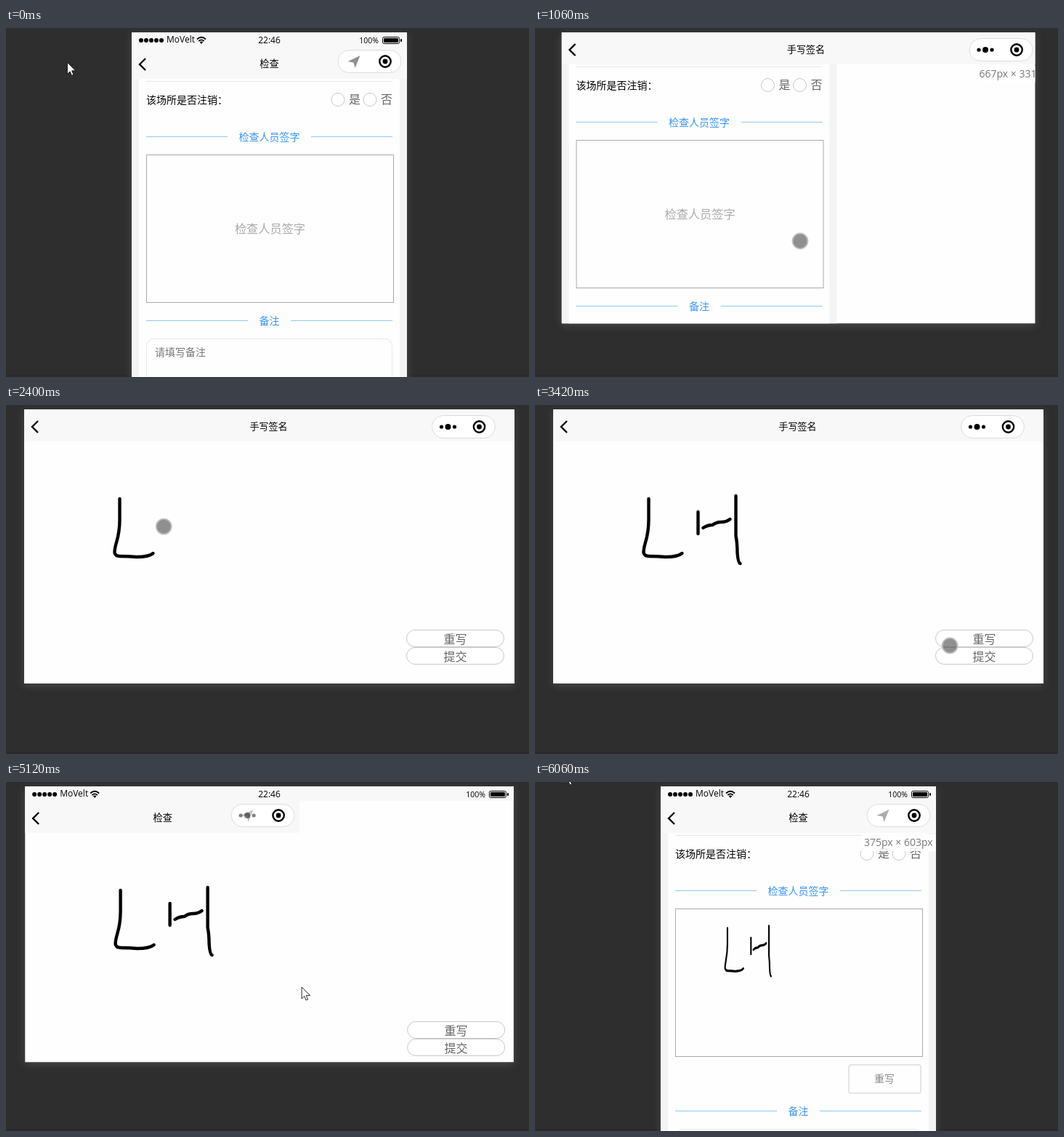
Animation of 720x480 px, one loop 6120 ms. Source, as an HTML page:

```html
<!DOCTYPE html>
<html lang="zh-CN">
<head>
<meta charset="utf-8">
<title>手写签名</title>
<style>
  html, body { margin: 0; width: 100%; height: 100%; overflow: hidden; background: #2e2e2e; }
  svg { display: block; width: 720px; height: 480px; }
  text { font-family: "Open Sans", "Noto Sans CJK SC", "Noto Sans CJK", sans-serif; white-space: pre; }
</style>
</head>
<body>
<svg id="stage" viewBox="0 0 720 480" xmlns="http://www.w3.org/2000/svg"></svg>
<script>
const LOOP = 6120;
const CENTER = 362.5, NARROW = 379, WIDE = 675, TALL = 674, SHORT = 377;
const OPEN = 860, CANVAS = 1180, SUBMIT = 3860, CLOSE = 5120, SIGNED = 5240;
const RESIZE = 300, PEN_SPEED = .5;

// The signature: when each stroke begins, and its shape.
const strokes = [
  { at: 1920, d: 'M157 129V158C157 185 150 190 150 203Q151 208 158 208Q170 208 180 209Q197 209 203 204' },
  { at: 2520, d: 'M225 147V177' },
  { at: 2700, d: 'M232 169Q238 165 245 165Q250 161 257 161Q264 161 269 157' },
  { at: 3080, d: 'M277 125V180Q279 190 279 203Q280 217 283 218' }
];

const text = (x, cy, size, fill, str, anchor = 'middle') =>
  `<text x="${x}" y="${cy + size * .37}" font-size="${size}" fill="${fill}" text-anchor="${anchor}">${str}</text>`;
const rect = (x, y, w, h, fill, extra = '') =>
  `<rect x="${x}" y="${y}" width="${w}" height="${h}" fill="${fill}" ${extra}/>`;
const disc = (x, y, r, extra = '') => `<circle cx="${x}" cy="${y}" r="${r}" ${extra}/>`;
const group = (id, body) => `<g id="${id}">${body}</g>`;
const repeat = (n, make) => Array.from({ length: n }, (_, i) => make(i)).join('');

const heading = (y, title, gap) =>
  rect(20, y - 1, 112 + gap, 1, '#90c8fa') + rect(247 - gap, y - 1, 112 + gap, 1, '#90c8fa') +
  text(189.5, y, 14, '#3b95f5', title);
const radio = (x, label) =>
  disc(x, 98.5, 9, 'fill="#fff" stroke="#c8c8c8"') + text(x + 23, 98.5, 16, '#666', label);
const pill = (y, label) =>
  rect(526.5, y + .5, 134, 23, '#fff', 'rx="11.5" stroke="#c8c8c8"') + text(593.5, y + 13, 16, '#666', label);

const ink = repeat(strokes.length, i => `<path d="${strokes[i].d}"/>`);
const inkStyle = 'fill="none" stroke="#000" stroke-width="4.4" stroke-linecap="round" stroke-linejoin="round"';

const form =
  rect(0, 70, NARROW, 640, '#f4f4f4') + rect(10, 70, 359, 640, '#fefefe') +
  rect(20, 73, 339, 1, '#e6e6e6') +
  text(20, 99, 14, '#000', '该场所是否注销：', 'start') + radio(284, '是') + radio(328, '否') +
  heading(150, '检查人员签字', 0) +
  rect(20.5, 174.5, 340, 203, '#fefefe', 'stroke="#aaa"') +
  group('hint', text(190.5, 276, 16.2, '#aaa', '检查人员签字')) +
  group('signed',
    `<g transform="translate(17.2 105.2) scale(.476 .742)" ${inkStyle}>${ink}</g>` +
    rect(259, 389, 99, 39, '#fefefe', 'rx="3" stroke="#ddd" stroke-width="1.5"') +
    text(308, 408, 14, '#888', '重写')) +
  group('remarks',
    heading(403, '备注', 28) +
    rect(20.5, 427.5, 338, 120, '#fefefe', 'rx="10" stroke="#e6e6e6"') +
    text(32, 446, 14, '#777', '请填写备注', 'start'));

const spinner = repeat(12, i =>
  rect(-1.5, -15, 3, 8, '#fff', `rx="1.5" opacity="${.15 + i * .07}" transform="rotate(${i * 30})"`));

const status = rect(0, 6, 700, 20, '#f8f8f8') +
  repeat(5, i => disc(13 + i * 7, 17, 3)) + text(48, 16, 12, '#000', 'MoVelt', 'start') +
  '<path d="M90 15.5Q96 10 102 15.5M92.3 18Q96 14.7 99.7 18" fill="none" stroke="#000" stroke-width="1.8"/>' +
  '<path d="M93.7 19.3Q96 17.5 98.3 19.3L96 22Z"/>' +
  group('clock', text(0, 17, 12, '#000', '22:46')) +
  group('battery', text(-39, 17, 10.5, '#000', '100%', 'end') +
    rect(-33.5, 12.5, 23, 9, 'none', 'rx="2" stroke="#000"') +
    rect(-32, 14, 20, 6, '#000', 'rx="1"') + rect(-9, 15, 2, 4, '#000', 'rx="1"'));

const nav = rect(0, 26, 700, 44, '#f8f8f8', 'id="navBar"') +
  '<path d="M19 42L11 50L19 58" fill="none" stroke="#000" stroke-width="2.4"/>' +
  group('formTitle', text(189.5, 49, 13.2, '#000', '检查')) +
  group('signTitle', text(336.5, 49, 13, '#000', '手写签名')) +
  group('capsule', rect(.5, 30.5, 87, 31, '#fff', 'rx="15.5" stroke="#dcdcdc"') +
    '<path id="plane" d="M31 38L14 46L22 47.5L24 55Z" fill="#222"/>' +
    group('dots', disc(13.5, 46, 2.6) + disc(22.5, 46, 4) + disc(31.5, 46, 2.6)) +
    disc(65.5, 46, 7.7, 'fill="none" stroke="#000" stroke-width="2.4"') + disc(65.5, 46, 3.4));

const stage = document.getElementById('stage');
stage.innerHTML =
  `<defs><clipPath id="frame">${rect(0, 6, NARROW, TALL, '#fff', 'id="clipBox"')}</clipPath>
   <filter id="blur" x="-20%" y="-20%" width="140%" height="140%"><feGaussianBlur stdDeviation="6"/></filter></defs>` +
  rect(0, 0, 720, 480, '#2e2e2e') + rect(0, 477, 720, 3, '#2f282b') +
  group('phone',
    rect(0, 9, NARROW, TALL, '#555', 'id="glow" filter="url(#blur)" opacity=".7"') +
    '<g clip-path="url(#frame)">' + rect(0, 6, 700, 690, '#fefefe') +
    group('form', form) +
    group('canvas', `<g id="ink" transform="translate(-25.5 0)" ${inkStyle}>${ink}</g>` +
      pill(309, '重写') + pill(333, '提交')) +
    group('label', rect(-4, 72, 103, 23, '#fff', 'opacity=".85"') +
      '<text id="size" x="0" y="88" font-size="14" fill="#777"></text>') +
    group('nav', nav) + group('status', status) +
    group('toast', rect(276, 86, 123, 122, '#111', 'rx="5" opacity=".7"') + group('spinner', spinner)) +
    '</g>') +
  group('touch', disc(0, 0, 10.4, 'fill="#5a5a5a" fill-opacity=".67" stroke="#bbb" stroke-opacity=".9" stroke-width="2"')) +
  group('arrow', '<path d="M.5 .5V16.5L4.2 13L6.5 18.5L9 17.5L6.7 12H12Z" fill="#fff" stroke="#111" stroke-width=".9"/>');

const el = {};
stage.querySelectorAll('[id]').forEach(node => { el[node.id] = node; });

const set = (id, name, value) => el[id].setAttribute(name, value);
const show = (id, on) => set(id, 'display', on ? 'inline' : 'none');
const move = (id, x, y) => set(id, 'transform', `translate(${x} ${y})`);
const mix = (a, b, u) => a + (b - a) * u;
const ramp = (t, from, to) => Math.min(1, Math.max(0, (t - from) / (to - from)));
const resized = (t, from) => 1 - (1 - ramp(t, from, from + RESIZE)) ** 2.3;

const pens = [...el.ink.children].map((path, i) => {
  const length = path.getTotalLength(), from = strokes[i].at;
  return { path, length, from, to: from + length / PEN_SPEED };
});

// The pointer glides from stop to stop; each stroke adds its two ends.
const stop = (t, x, y) => ({ t, x, y });
const stops = [
  stop(0, 83, 46), stop(300, 365, 293), stop(1700, 365, 293),
  ...pens.flatMap(({ path, length, from, to }) => {
    const a = path.getPointAtLength(0), b = path.getPointAtLength(length);
    return [stop(from, a.x, a.y), stop(to, b.x, b.y)];
  }),
  stop(3440, 607, 345), stop(SUBMIT, 607, 345), stop(CLOSE, 407, 282),
  stop(5360, 311, 180), stop(5700, 45, -12), stop(LOOP, 41, -15)
];

function pointer(t) {
  const pen = pens.find(p => t > p.from && t < p.to);
  if (pen) return pen.path.getPointAtLength((t - pen.from) * PEN_SPEED);
  const i = stops.findIndex(s => s.t > t);
  const a = stops[i - 1], b = stops[i], u = ramp(t, a.t, b.t);
  return { x: mix(a.x, b.x, u), y: mix(a.y, b.y, u) };
}

function drawInk(t) {
  for (const { path, length, from, to } of pens) {
    const u = ramp(t, from, to);
    path.setAttribute('display', u > 0 ? 'inline' : 'none');
    path.setAttribute('stroke-dasharray', u < 1 ? `${u * length} ${length * 2}` : 'none');
  }
}

function render(t) {
  const wide = resized(t, OPEN) - resized(t, CLOSE);
  const width = mix(NARROW, WIDE, wide), left = CENTER - width / 2;
  const landscape = t >= OPEN && t < CLOSE;
  const lift = landscape ? -20 : 0;
  const signing = t >= CANVAS && t < SIGNED;
  const signed = t >= SIGNED;

  move('phone', left, 0);
  for (const id of ['clipBox', 'glow']) {
    set(id, 'width', width);
    set(id, 'height', mix(TALL, SHORT, wide));
  }

  show('form', !signing);
  move('form', 0, lift);
  show('hint', !signed);
  show('signed', signed);
  move('remarks', 0, signed ? 50 : 0);
  show('canvas', signing);
  move('canvas', 0, landscape ? 0 : 20);

  show('label', (t >= 920 && t < 1860) || signed);
  move('label', landscape ? 575 : 280, lift);
  el.size.textContent = landscape ? '667px × 331px' : '375px × 603px';

  show('status', !landscape);
  move('clock', width / 2, 0);
  move('battery', width, 0);
  move('nav', 0, lift);
  set('navBar', 'width', landscape ? 700 : 378);
  show('formTitle', !landscape);
  show('signTitle', landscape);
  move('capsule', landscape ? 561 : 283.5, landscape ? 4 : 0);
  const dots = ramp(t, OPEN, OPEN + 200) - ramp(t, CLOSE - 100, CLOSE + 100);
  const pulse = .5 + .35 * Math.sin(2 * Math.PI * 6 * t / LOOP);
  set('dots', 'opacity', dots);
  set('plane', 'opacity', (1 - dots) * pulse);

  show('toast', t >= SUBMIT && t < CLOSE);
  set('spinner', 'transform', `translate(337.5 135) rotate(${Math.floor(t / 1000 * 12) * 30})`);

  drawInk(t);
  const { x, y } = pointer(t);
  const overPhone = x > left && x < left + width && y > 6;
  const touching = overPhone && !(t >= CLOSE && t < SIGNED);
  show('touch', touching);
  show('arrow', !touching);
  move('touch', x, y);
  move('arrow', x, y);
}

const start = performance.now();
function tick() {
  render((performance.now() - start) % LOOP);
  requestAnimationFrame(tick);
}
tick();
</script>
</body>
</html>
```
